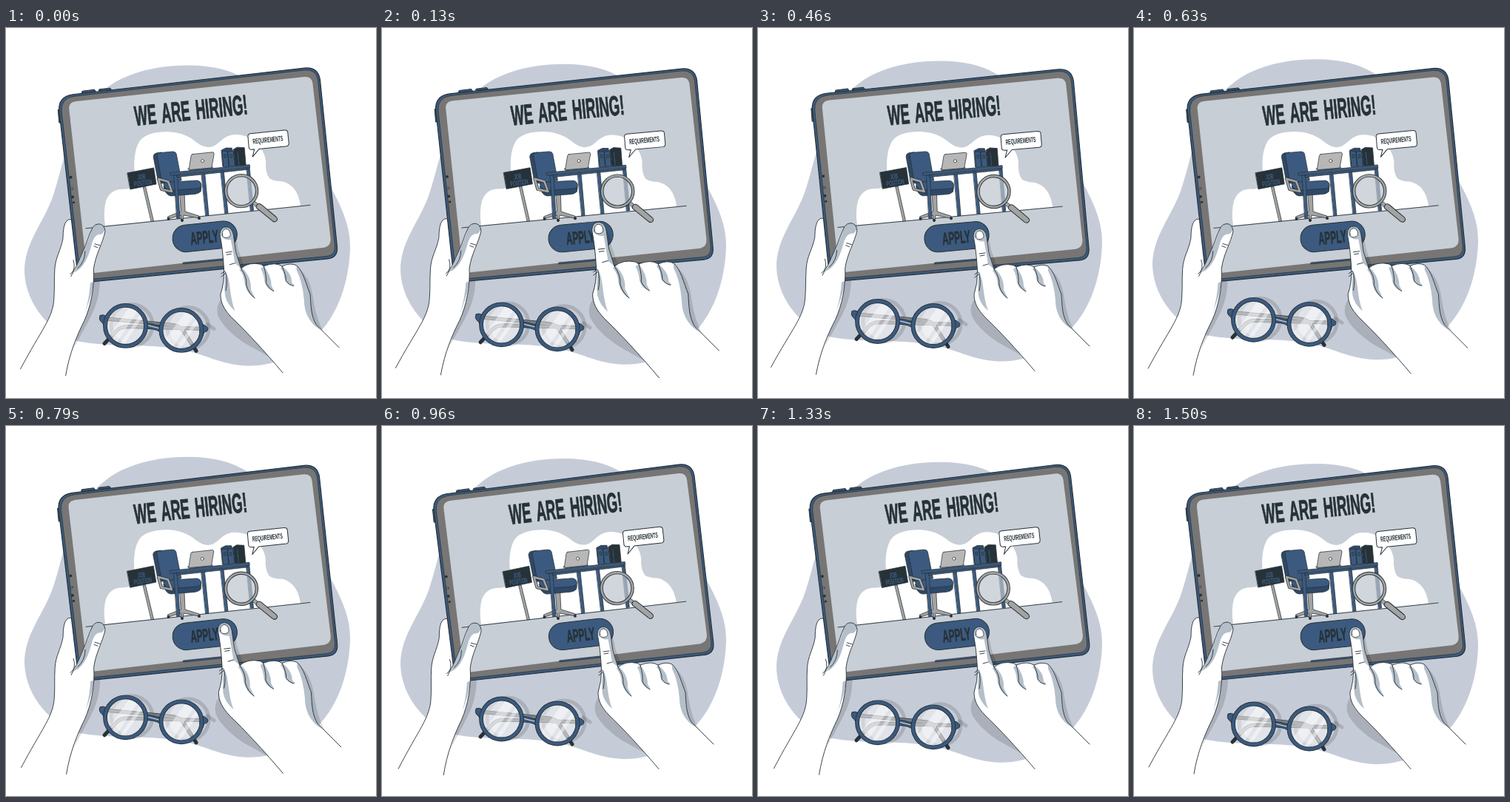
These frames come from a looping animation (500 px wide and 500 px high, 1.54 s). An HTML page:

```html
<!DOCTYPE html>
<html lang="en">
<head>
<meta charset="utf-8">
<title>We are hiring</title>
<style>
  html, body { margin: 0; width: 100%; height: 100%; overflow: hidden; background: #fff; }
  svg { display: block; width: 100%; height: 100%; }
  path, rect, circle { stroke-linecap: round; stroke-linejoin: round; }
  .o { stroke: #263238; stroke-width: 1; }
  .thin { stroke-width: .75; }
  .line { fill: none; stroke: #263238; stroke-width: .9; }
  .blue { fill: #3c5a7f; }
  .deep { fill: #2f4867; }
  .dark { fill: #263238; }
  .gray { fill: #a3a3a3; }
  .white { fill: #fff; }
  .tone { fill: #b5bfc9; }
  .shade { fill: #000; fill-opacity: .14; }
  text { font-family: "Liberation Sans", Arial, sans-serif; font-weight: 700; text-anchor: middle; fill: #263238; }
  .sign text { fill: #3f5f86; }
</style>
</head>
<body>
<svg viewBox="0 0 500 500">
  <path id="blob" fill="#c6ccd7" d="M250 51C298 52 328 66 357 97C385 130 418 170 438 214C455 245 466 270 465 300C463 345 449 385 424 412C400 438 368 458 325 457C288 455 270 441 232 434C190 427 140 432 98 424C62 413 27 376 25 331C24 292 50 265 63 229C78 189 83 122 133 84C160 61 205 50 250 51Z"/>

  <g id="specs">
    <g fill="none" stroke="#000" stroke-opacity=".14" stroke-width="5">
      <circle cx="170" cy="402" r="28"/><circle cx="246" cy="406" r="28"/>
      <path d="M198 401L218 404M272 401L281 407"/>
    </g>
    <g fill="none">
      <path d="M131 393L226 402Q236 403 241 412L257 437M270 407L164 404Q154 404 148 411L133 427" stroke="#263238" stroke-width="5"/>
      <path d="M131 393L226 402Q236 403 241 412L250 426M270 407L164 404Q154 404 148 411L141 418" stroke="#777c80" stroke-width="3.8"/>
    </g>
    <g fill="#fff" fill-opacity=".45">
      <circle cx="161.500" cy="403" r="27"/><circle cx="237" cy="409" r="27"/>
      <path d="M141 414L166 379L178 383L150 425ZM154 427L181 388L184 392L159 429ZM216 420L242 385L254 389L226 431ZM230 433L257 394L260 398L235 435Z"/>
    </g>
    <path class="blue o" d="M189 399Q199 400 209 404L208 411Q199 406 189 407Z"/>
    <path d="M192 402.500L206 406" stroke="#fff" stroke-width=".9"/>
    <path class="blue o" d="M136 390Q131 387 127 389Q125 394 128 397Q131 399 132 402L136 397Z"/>
    <path class="blue o" d="M263 400Q270 402 273 406Q273 411 269 411Q267 412 266 417L262 412Z"/>
    <g fill="none">
      <g stroke="#263238" stroke-width="5.800"><circle cx="161.500" cy="403" r="27.500"/><circle cx="237" cy="409" r="27.500"/></g>
      <g stroke="#3c5a7f" stroke-width="4"><circle cx="161.500" cy="403" r="27.500"/><circle cx="237" cy="409" r="27.500"/></g>
    </g>
  </g>

  <g id="pad">
    <path class="shade" d="M112 340L127 341Q127 360 120 379C111 400 98 420 84 448L92 400Z"/>
    <path class="white" d="M94 262Q87 256 82 261Q77 266 77 285C74 301 67 310 66 326C65 341 66 354 65 366C64 392 48 408 20 461L81 470L118 340Z"/>
    <path class="line" d="M92 262Q87 256 82 261Q77 266 77 285C74 301 67 310 66 326C65 341 66 354 65 366C64 392 48 408 20 461"/>

    <path class="blue o" d="M102 88L103 85.500L119 83.500L121 86ZM125 85L126 83L140 81.300L142 83.500ZM73 110L70 111L71.500 128L75 129Z"/>
    <path class="blue o" style="stroke-width:1.200" d="M90 90L403 53.800Q421 52 424 69L447.500 295Q449 310 435 311.500L116 343Q99 344 96.500 329L71.500 112Q70 93 90 90Z"/>
    <path class="o thin" fill="#777675" d="M91 92.600L403 56.600Q418.500 55 421.200 70L444.500 294Q445.500 306.500 434 308L117 339.500Q102 340.500 99.800 328L74.800 113Q73.500 95.500 91 92.600Z"/>
    <path fill="#c7ced5" d="M95 99.300L403 65.700Q412.500 65 414 74L438.700 284Q439.500 294 430 296.300L117 331.500Q111 332 109 322L85 110Q84 100.500 95 99.300Z"/>
    <g class="dark">
      <circle cx="87.500" cy="202" r="1.900"/><circle cx="90" cy="228.500" r="1.900"/><circle cx="91.500" cy="236" r="1.600"/>
    </g>
    <circle cx="89" cy="217.500" r="1.500" fill="#8d8d8d" class="o thin"/>

    <path class="white" d="M134 267.500Q131 248 135 234Q141 217 160 218Q174 217 175 203C172 188 172 165 181 152C192 138 227 137 244 146C256 151 260 160 273 161C287 161 290 146 307 144C334 142 350 165 351 180Q350 195 356 203Q362 207 373 207Q394 212 398 240Z"/>
    <path class="line" d="M108 271L411 239"/>

    <path class="gray o thin" d="M185.500 215L188.500 214.500L199.500 261L196.500 261.500Z"/>
    <path class="dark o thin" d="M164 196L199.500 189L203 211L168 218Z"/>
    <g class="sign" font-size="10">
      <text transform="translate(183.500 204.500) rotate(-9) scale(.51 1)">JOB</text>
      <text transform="translate(185.500 212.800) rotate(-9) scale(.51 1)">POSITION</text>
    </g>

    <path class="gray o thin" d="M235 223L241 222.500L242 248L261 254L261 257L240 253L239 259L236.500 259L236.500 253L219 258L218.500 255L236 248Z"/>
    <g class="dark"><circle cx="219.500" cy="258" r="2"/><circle cx="238" cy="260" r="2"/><circle cx="261" cy="257" r="2"/></g>
    <path class="deep o thin" d="M199 174Q199 170 203 169L210 168L222 208L211 210Q206 210 205 205Z"/>
    <path class="blue o thin" d="M204 172Q204 169 209 168.500L225 167Q229 167 230 170L237 206L214 209.500Q211 209 210 205Z"/>
    <path class="deep o thin" d="M213 214L262 209Q265 214 263 221Q260 224 255 224.500L223 227Q215 226 213 214Z"/>
    <path class="blue o thin" d="M213 211Q213 209 217 208.500L258 206Q264 207 264 213Q262 217 257 217L222 219.500Q214 218 213 211Z"/>
    <g fill="none">
      <path stroke="#263238" stroke-width="4.200" d="M206 204L219 207.500L224 221L210 218Z"/>
      <path stroke="#a3a3a3" stroke-width="2.700" d="M206 204L219 207.500L224 221L210 218Z"/>
    </g>

    <g class="blue">
      <path class="o thin" d="M264 196L268.500 195.500L274 253L270 253.500ZM290 193L294 192.500L300 250L296 250.500ZM325 189L329 188.500L334.500 246L330.500 246.500ZM227 199L231.500 198.500L235 257L231 257.500Z"/>
      <path class="o thin" d="M231 199L327 189L327.300 191L231 201.500Z"/>
      <path class="o thin" d="M222 195.500L329 184.500L329.500 188.300L222.500 199.300Z"/>
    </g>
    <path class="gray o thin" d="M246 190L278 187L279.500 189L248 192.500Z"/>
    <path class="o thin" fill="#b7b7b7" d="M252 170.500L279 167.700Q281 167.700 281 170L278 187.500Q277.500 189 276 189L249 191.500Q247 191.500 247.300 189.500L250 172.500Q250.300 170.700 252 170.500Z"/>
    <circle class="white o thin" cx="265.500" cy="179.500" r="2"/>

    <path class="deep o thin" d="M291 165L297 162L305 162L310 185L293 187Z"/>
    <path class="blue o thin" d="M292 167L299 166L301 187L294 187.700ZM300 167L307 166L309.500 186L302 187Z"/>
    <path class="dark o thin" d="M307 164L312 161L322 161.500L324 185L310 186Z"/>
    <path class="blue o thin" d="M312 167L313.500 166.800L315.500 185.500L314 185.700ZM295 171L297 170.700L297.500 175L295.500 175.300ZM303 171L305 170.700L305.500 175L303.500 175.300Z"/>

    <path class="white o" d="M330 142.500L376 137.800Q380 137.500 380.500 140.500L382 155.500Q382 159 379 159.500L342 163.200L333 174L335.500 163.800L331.500 164Q328.300 164 328 161L326.700 146Q326.700 143 330 142.500Z"/>
    <text transform="translate(354 154.300) rotate(-6) scale(.51 1)" font-size="10">REQUIREMENTS</text>

    <path class="gray o thin" d="M333 237L336 234L343 239.500L340.500 243Z"/>
    <path class="gray o" d="M339 239Q341 236 345 238.500L365 255Q368 258 365.500 260.500Q363.500 263 360 260.500L339 243.500Q337 241.500 339 239Z"/>
    <circle cx="318" cy="220" r="20" fill="#bcc5ce" fill-opacity=".7"/>
    <g fill="none">
      <circle cx="318" cy="220" r="21" stroke="#263238" stroke-width="4.400"/>
      <circle cx="318" cy="220" r="21" stroke="#a3a3a3" stroke-width="2.600"/>
    </g>

    <text transform="translate(251 124) rotate(-6) scale(.49 1)" font-size="37.500" word-spacing="5" stroke="#263238" stroke-width="1">WE ARE HIRING!</text>
    <rect class="blue o" x="225" y="263.500" width="87.500" height="36.500" rx="18.200" transform="rotate(-6 268.700 281.700)"/>
    <text transform="translate(269 291) rotate(-6) scale(.49 1)" font-size="24" stroke="#263238" stroke-width=".6">APPLY</text>
    <path class="blue o thin" d="M239.500 317L305 310.500L305 312.500L239.700 319Z"/>

    <path class="white" d="M117 270C111 282 109 292 104 302C99 314 96 324 87 333L70 368L40 450L81 470C86 440 96 416 106 396C115 376 120 350 118.500 326C121 306 131 291 134 275Q133 265 125 265Q120 265 117 270Z"/>
    <path class="tone" d="M117 270Q120 265 126 265Q133 266 133.500 273Q131 280 126 279Q120 280 117 289C113 302 110 318 97 328L89 332Q99 320 104 303Q111 289 117 270ZM118.500 343C117 361 110 376 103 396C111 376 113 359 114 345Z"/>
    <path class="line" d="M81 470C86 440 96 416 106 396C115 376 120 350 118.500 326C121 306 131 291 134 275Q133 265 125 265Q120 265 117 270C111 282 109 292 104 302C99 314 96 324 87 333M107 302Q107 316 97 325M91 314Q95 324 88 336M120 292L127 294M119 295L124 297"/>
  </g>

  <g id="hand">
    <path class="shade" d="M306 275Q314 286 315 300L323 323L313 326Z"/>
    <path class="shade" d="M293 366Q286 374 288 386C292 400 312 418 330 428Q345 436 358 444L330 412L300 384ZM397 328Q408 337 412 355C416 374 416 388 429 412L412 393Z"/>
    <path class="white" d="M291 281Q292 271 300 271.500Q307 272 309 282L312 304L319 326Q329 317 345 320.500L349 323Q364 317 373 323Q384 318 392 322C401 330 404 345 410 360C411 376 411 388 418 400L448 430L374 463.500C350 435 325 408 306 390C297 380 292 372 292 360Q297 345 296.500 328Q295 300 291 281Z"/>
    <path class="tone" d="M299 330C306 343 303 361 311 382Q301 374 298 362Q296 347 299 330ZM320 325Q333 337 332 354L338 366Q327 360 324 347Q323 334 317 328ZM349 323Q359 336 359 349L363 356Q353 354 350 344Q349 333 345 326ZM373 323Q386 333 386 345L390 349Q379 349 376 339Q376 331 371 326ZM392 322C401 330 404 345 410 360C411 376 411 388 418 400L424 407C408 398 402 382 402 368Q400 344 392 328Z"/>
    <path class="tone" d="M291.500 282Q292 271 300 271.500Q307 272 309 282L312 304L319 326L311 319Q308 301 305.500 288Q298 290 291.500 282Z"/>
    <path class="line" d="M374 463.500C350 435 325 408 306 390C297 380 292 372 292 360Q297 345 296.500 328Q295 300 291 281Q292 271 300 271.500Q307 272 309 282L312 304L319 326Q329 317 345 320.500L349 323Q364 317 373 323Q384 318 392 322C401 330 404 345 410 360C411 376 411 388 418 400L448 430"/>
    <path class="line" d="M319 326Q327 337 326 348Q329 359 337 365M349 323Q353 337 352 345Q356 353 362 356M373 323Q379 337 378 342Q382 348 388 349M298 330Q302 341 299 355M299 305L307 304M300 308L306 307M304 321L311 319M293 333L297 330M293 337L298 333"/>
    <path class="white o thin" d="M294.500 282Q293.500 275 299 274Q304 274 305 281Q305 285 300 285.500Q295 286 294.500 282Z"/>
  </g>
</svg>
<script>
  const LOOP = 1540, LEAD = 40;
  const swing = [[0, 0], [.25, 1], [.75, -1], [1, 0]];
  const lift = [[0, 0], [.5, -10], [1, 0]];
  const beat = [[0, 1], [.1, 1.1], [.3, 1], [.4, 1], [.5, 1.1], [.6, 1], [1, 1]];
  const [blob, specs, pad, hand] = ["blob", "specs", "pad", "hand"].map(id => document.getElementById(id));

  // Linear interpolation through [position, value] keys
  function at(keys, u) {
    const i = Math.max(1, keys.findIndex(k => u <= k[0]));
    const [a, from] = keys[i - 1], [b, to] = keys[i];
    return from + (to - from) * (u - a) / (b - a);
  }

  function draw(now) {
    const u = ((now + LEAD) % LOOP) / LOOP;
    const float = `translate(0 ${at(lift, u)})`;
    blob.setAttribute("transform", float);
    specs.setAttribute("transform", float);
    pad.setAttribute("transform", `rotate(${at(swing, u)} 234 262)`);
    hand.setAttribute("transform", `translate(370 367) scale(${at(beat, u)}) translate(-370 -367)`);
  }

  function tick(now) {
    draw(now);
    requestAnimationFrame(tick);
  }
  draw(0);
  requestAnimationFrame(tick);
</script>
</body>
</html>
```
